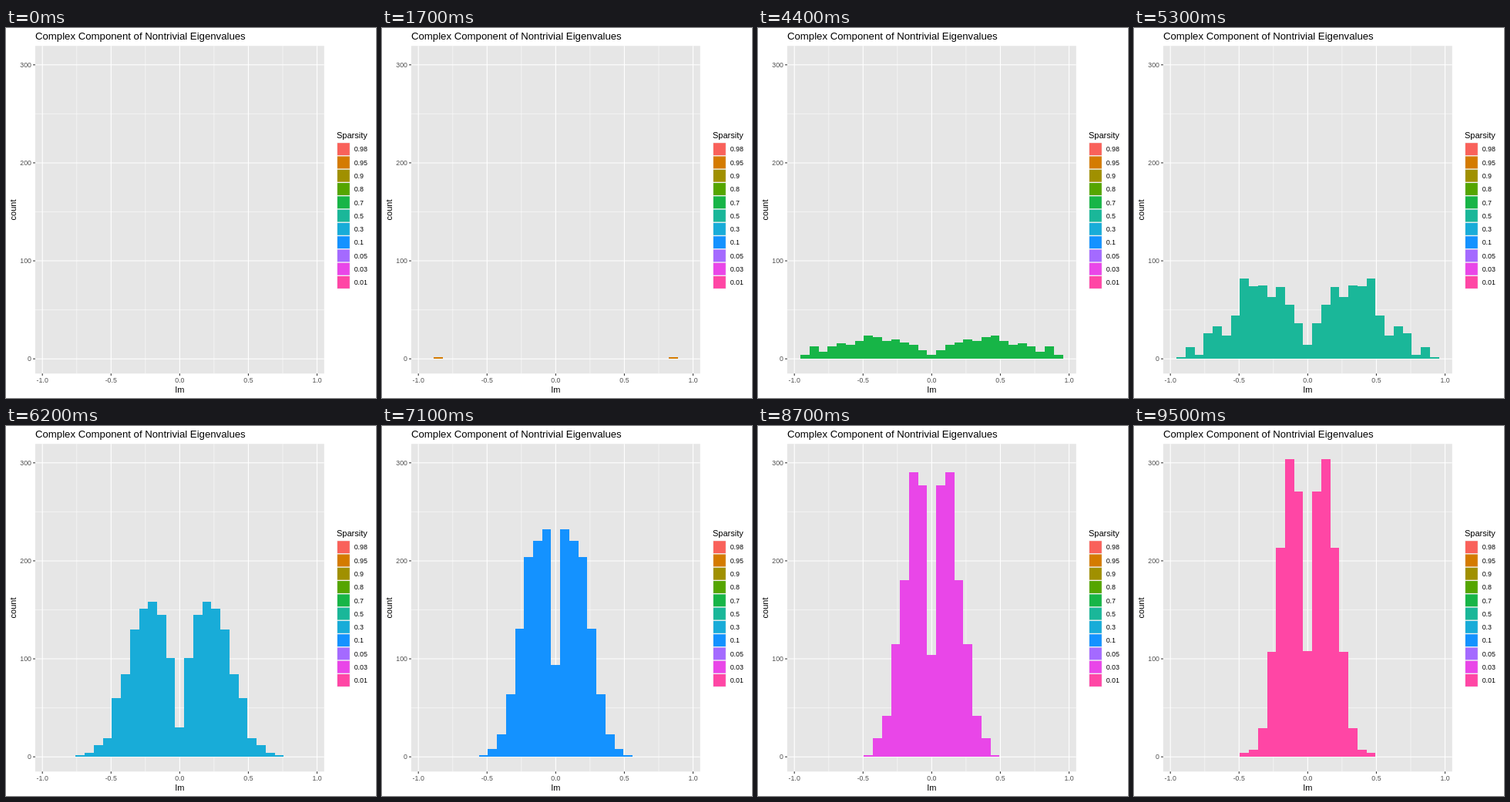
Recreate the animation shown at these times as an HTML page. Size 480x480 px, loop 10 s.

```html
<!DOCTYPE html>
<html lang="en">
<head>
<meta charset="utf-8">
<title>Eigenvalue histogram</title>
<style>
  html, body { margin: 0; width: 100%; height: 100%; overflow: hidden; background: #fff; }
  svg { display: block; width: 480px; height: 480px; }
  text { font-family: "Liberation Sans", Arial, sans-serif; font-size: 8.8px; }
  .tick { fill: #4d4d4d; }
  .label { font-size: 11px; }
  .title { font-size: 13.2px; }
</style>
</head>
<body>
<svg id="chart" viewBox="0 0 480 480"></svg>
<script>
const LOOP = 10000;
const BASE = 429.2, UNIT = 1.2714;
const MID = 225.36, HALF = 178.15, BIN = 11.745;

const levels = [
  ["0.98", "#f9615a"], ["0.95", "#d47b00"], ["0.9", "#a09000"], ["0.8", "#55a500"],
  ["0.7", "#17b547"], ["0.5", "#1ab799"], ["0.3", "#18acd8"], ["0.1", "#1492ff"],
  ["0.05", "#a46aff"], ["0.03", "#e946e8"], ["0.01", "#ff46a5"]
];

// start time, level index, counts per bin from the centre outwards
const outer = n => [...Array(13).fill(0), n];
const steps = [
  [0, 0, []],
  [800, 0, outer(1)],
  [1700, 1, outer(2)],
  [2600, 2, outer(3)],
  [3500, 3, [0, 0, 4, 1, 8, 4, 7, 5, 7, 5, 5, 8, 2, 12]],
  [4400, 4, [4, 9, 14, 17, 20, 18, 22, 24, 18, 14, 16, 13, 7, 13, 4]],
  [5300, 5, [14, 36, 55, 73, 63, 75, 74, 82, 44, 24, 33, 26, 4, 12, 2]],
  [6200, 6, [30, 101, 145, 158, 151, 130, 84, 60, 19, 12, 4, 2]],
  [7100, 7, [94, 232, 220, 204, 131, 64, 23, 8, 2]],
  [7900, 8, [102, 258, 298, 186, 112, 48, 17, 4]],
  [8700, 9, [104, 277, 290, 180, 115, 42, 19, 2]],
  [9500, 10, [108, 271, 304, 213, 107, 29, 7, 4]]
];

const svg = document.getElementById("chart");

function add(tag, attrs, content) {
  const el = document.createElementNS("http://www.w3.org/2000/svg", tag);
  for (const key in attrs) el.setAttribute(key, attrs[key]);
  if (content) el.textContent = content;
  return svg.appendChild(el);
}

const rect = (x, y, width, height, fill) => add("rect", { x, y, width, height, fill });
const line = (x1, y1, x2, y2, width, stroke) =>
  add("line", { x1, y1, x2, y2, stroke, "stroke-width": width });
const text = (x, y, cls, content, anchor = "start") =>
  add("text", { x, y, class: cls, "text-anchor": anchor }, content);

const xPos = v => MID + v * HALF;
const yPos = n => BASE - n * UNIT;
const vline = (v, w) => line(xPos(v), 23.2, xPos(v), 448.3, w, "#fff");
const hline = (n, w) => line(37.9, yPos(n), 412.8, yPos(n), w, "#fff");

rect(37.9, 23.2, 374.9, 425.1, "#e6e6e6");
[50, 150, 250].forEach(n => hline(n, 0.53));
[-0.75, -0.25, 0.25, 0.75].forEach(v => vline(v, 0.53));
[0, 100, 200, 300].forEach(n => hline(n, 1.07));
[-1, -0.5, 0, 0.5, 1].forEach(v => vline(v, 1.07));

const bars = add("path", { "shape-rendering": "crispEdges" });

[0, 100, 200, 300].forEach(n => {
  line(35.1, yPos(n), 37.9, yPos(n), 1.07, "#333");
  text(33, yPos(n) + 3.2, "tick", String(n), "end");
});
[-1, -0.5, 0, 0.5, 1].forEach(v => {
  line(xPos(v), 448.3, xPos(v), 451.1, 1.07, "#333");
  text(xPos(v), 460, "tick", v.toFixed(1), "middle");
});

text(38, 15, "title", "Complex Component of Nontrivial Eigenvalues");
text(225.4, 473, "label", "Im", "middle");
add("text", { class: "label", "text-anchor": "middle", transform: "translate(13.3 236) rotate(-90)" }, "count");

text(429, 143, "label", "Sparsity");
rect(429.2, 148.5, 17.3, 190.1, "#f2f2f2");
levels.forEach(([name, color], i) => {
  const y = 148.5 + i * 17.28;
  rect(429.9, y + 0.71, 15.9, 15.9, color);
  text(451.7, y + 11.9, "", name);
});

function barPath(counts) {
  const edge = k => Math.round(MID + (k - 0.5) * BIN);
  const bottom = Math.round(BASE);
  let d = "";
  counts.forEach((n, i) => {
    if (!n) return;
    const top = Math.round(yPos(n));
    for (const k of i ? [-i, i] : [0])
      d += `M${edge(k)} ${bottom}V${top}H${edge(k + 1)}V${bottom}Z`;
  });
  return d;
}

const states = steps.map(([at, level, counts]) => ({ at, color: levels[level][1], d: barPath(counts) }));
let shown = null;

function draw(now) {
  const t = now % LOOP;
  const state = states.filter(s => s.at <= t).pop();
  if (state !== shown) {
    bars.setAttribute("d", state.d);
    bars.setAttribute("fill", state.color);
    shown = state;
  }
}

const start = performance.now();
function tick(now) {
  draw(Math.max(0, now - start));
  requestAnimationFrame(tick);
}
draw(0);
requestAnimationFrame(tick);
</script>
</body>
</html>
```
